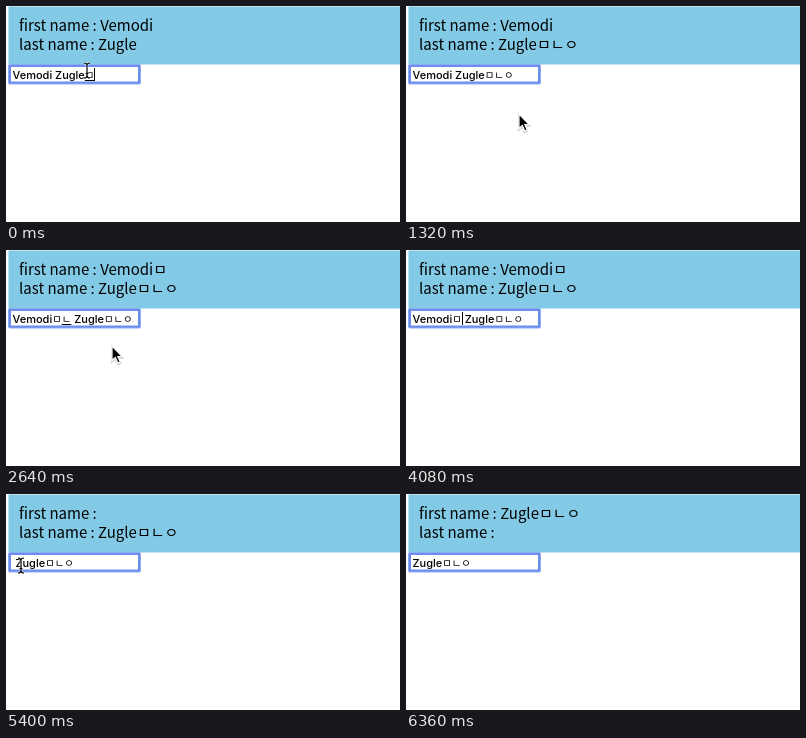
These frames come from a looping animation (394x216 px, 6420 ms). An HTML page:

```html
<!DOCTYPE html>
<html lang="en">
<head>
<meta charset="utf-8">
<title>Name field</title>
<style>
  html, body { margin: 0; width: 100%; height: 100%; overflow: hidden; background: #fff; }
  svg { position: absolute; left: 0; top: 0; }
  text { white-space: pre; fill: #000; }
  .banner { font: 15px "Noto Sans CJK KR", "Noto Sans CJK JP", "Noto Sans CJK", sans-serif; }
  .field { font: 500 11px Inter, sans-serif; }
  .field .jamo { font: 500 10.4px "Noto Sans CJK KR", "Noto Sans CJK JP", "Noto Sans CJK", sans-serif; }
</style>
</head>
<body>
<svg width="394" height="216" viewBox="0 0 394 216">
  <defs>
    <filter id="soft" x="-20%" y="-50%" width="140%" height="200%"><feGaussianBlur stdDeviation=".7"/></filter>
    <path id="arrowShape" d="M0 0V14.5L3.3 11.4L5.9 17L8.3 15.9L5.8 10.5H10.3Z"/>
    <path id="beamShape" d="M-3 -7.5Q0 -7.5 0 -5V5Q0 7.5 -3 7.5M3 -7.5Q0 -7.5 0 -5V5Q0 7.5 3 7.5M-1.5 3H1.5"/>
  </defs>
  <rect x="2.5" y=".5" width="391.5" height="58" fill="#82cae5"/>
  <text class="banner" x="13" y="25" id="first"></text>
  <text class="banner" x="13" y="43.5" id="last"></text>

  <rect x="2" y="58" width="133" height="20.5" rx="2" fill="#8fabf5" filter="url(#soft)"/>
  <rect x="4" y="60" width="129" height="16.5" fill="#fff" stroke="#6c8dec" stroke-width="2"/>
  <text class="field" x="6.5" y="73" id="field"></text>
  <rect id="underline" y="74" height="1" fill="#000"/>
  <rect id="caret" y="62" width="1" height="13" fill="#000"/>

  <g id="arrow">
    <use href="#arrowShape" y="1" fill="#99a" stroke="#99a" stroke-width="2" opacity=".5" filter="url(#soft)"/>
    <use href="#arrowShape" stroke="#fff" stroke-width="1.2"/>
  </g>
  <g id="beam" fill="none">
    <use href="#beamShape" stroke="#fff" stroke-width="2.6" stroke-opacity=".7"/>
    <use href="#beamShape" stroke="#000" stroke-width="1.2"/>
  </g>
</svg>
<script>
const LOOP = 6420, TICK = 60;
const GIVEN = 'Vemodi', FAMILY = 'Zugle';
const TAIL = ' ' + FAMILY + 'ㅁㄴㅇ';
const $ = id => document.getElementById(id);

// time, text before the caret, syllable being composed, text after, caret shown
const edits = [
  [0, GIVEN + ' ' + FAMILY, 'ㅁ', '', true],
  [180, GIVEN + ' ' + FAMILY + 'ㅁ', 'ㄴ', '', true],
  [540, GIVEN + ' ' + FAMILY + 'ㅁㄴ', 'ㅇ', '', true],
  [1140, GIVEN, '', TAIL, false],
  [1800, GIVEN, 'ㅁ', TAIL, true],
  [1860, GIVEN + 'ㅁ', 'ㄴ', TAIL, true],
  [2220, GIVEN + 'ㅁ', 'ㄴ', TAIL, false],
  [2700, GIVEN + 'ㅁ', 'ㄴ', TAIL, true],
  [2940, GIVEN + 'ㅁ', '', TAIL, true],
  [3480, GIVEN + 'ㅁ', '', TAIL, false],
  [3960, GIVEN + 'ㅁ', '', TAIL, true],
  [4200, GIVEN, '', TAIL, true],
  [4260, GIVEN.slice(0, 5), '', TAIL, true],
  [4380, GIVEN.slice(0, 4), '', TAIL, true],
  [4560, GIVEN.slice(0, 3), '', TAIL, true],
  [4680, GIVEN.slice(0, 2), '', TAIL, false],
  [4920, GIVEN.slice(0, 1), '', TAIL, false],
  [5040, '', '', TAIL, false],
  [5820, '', '', TAIL.trim(), false]
];

// time, x, y of the pointer
const moves = [
  [0, 81, 64.5], [660, 46, 69], [720, 46, 69], [840, 37, 70], [1140, 37, 70],
  [1320, 113, 108], [1440, 114, 111], [1740, 106, 96], [3360, 106, 96],
  [3540, 400, 45], [4140, 400, 70], [4380, 60, 96], [4500, 60, 96],
  [4800, 36, 76.5], [5100, 28, 74], [5400, 15, 71.5], [5820, 15, 71.5],
  [6120, 47, 140], [6360, 60, 219], [LOOP, 60, 219]
];

const stepAt = (table, t) => table.findLastIndex(row => row[0] <= t);

function pointerAt(t) {
  const i = stepAt(moves, t);
  const [t0, x0, y0] = moves[i], [t1, x1, y1] = moves[i + 1];
  const k = (t - t0) / (t1 - t0);
  return [x0 + (x1 - x0) * k, y0 + (y1 - y0) * k];
}

function setText(el, string) {
  el.replaceChildren(...(string.match(/[ㄱ-ㅎ]+|[^ㄱ-ㅎ]+/g) || []).map(run => {
    const span = document.createElementNS(el.namespaceURI, 'tspan');
    if (/[ㄱ-ㅎ]/.test(run)) span.setAttribute('class', 'jamo');
    span.textContent = run;
    return span;
  }));
}

const widthOf = (el, count) => count ? el.getSubStringLength(0, count) : 0;
const show = (el, on) => el.setAttribute('visibility', on ? 'visible' : 'hidden');

function drawEdit([, before, composing, after, caretOn]) {
  const [first, last = ''] = (before + after).split(' ');
  setText($('first'), 'first name : ' + first);
  setText($('last'), 'last name : ' + last);

  const field = $('field');
  setText(field, before + composing + after);
  const start = 6.5 + widthOf(field, before.length);
  const end = 6.5 + widthOf(field, before.length + composing.length);
  $('underline').setAttribute('x', start);
  $('underline').setAttribute('width', end - start);
  $('caret').setAttribute('x', Math.round(end));
  show($('caret'), caretOn);
}

function drawPointer([x, y]) {
  const overField = x < 135 && y > 58 && y < 79;
  for (const id of ['arrow', 'beam']) {
    $(id).setAttribute('transform', `translate(${x} ${y})`);
    show($(id), (id === 'beam') === overField);
  }
}

let shown = -1;
function frame() {
  const t = Math.floor(performance.now() % LOOP / TICK) * TICK;
  const i = stepAt(edits, t);
  if (i !== shown) drawEdit(edits[shown = i]);
  drawPointer(pointerAt(t));
  requestAnimationFrame(frame);
}
frame();
</script>
</body>
</html>
```
